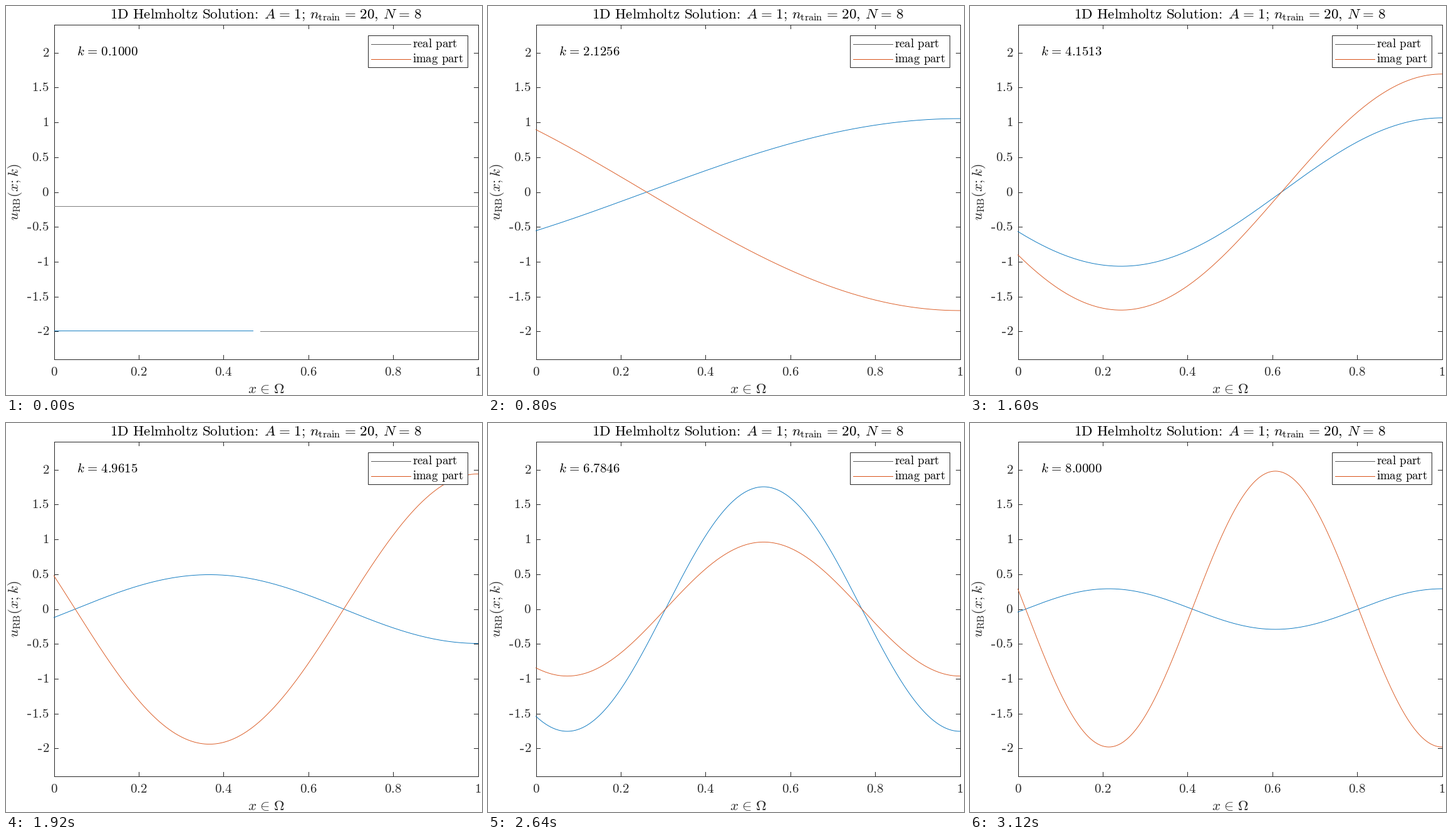
A matplotlib script for the animation above (3200 ms loop, 760x622 px).

```python
import numpy as np
import matplotlib.pyplot as plt
from matplotlib.animation import FuncAnimation
from matplotlib.patches import Rectangle

W, H, DPI = 760, 622, 64
FRAMES, INTERVAL = 40, 80
K_MIN, K_MAX = 0.1, 8.0

LEFT, RIGHT, TOP, BOTTOM = 76.5, 753.5, 29.5, 564.5
Y_ZERO, Y_UNIT = 297.5, 535 / 4.8

INK, GREY = "#262626", "#7f7f7f"
BLUE, ORANGE = "#0072BD", "#D95319"
BASE, LARGE, SMALL = 20.9, 23.0, 18.85

SP = r"\hspace{0.38}"
GAP = r"\hspace{0.115}"
EQ = GAP + "=" + GAP

plt.rcParams["mathtext.fontset"] = "cm"

fig = plt.figure(figsize=(W / DPI, H / DPI), dpi=DPI, facecolor="white")
ax = fig.add_axes([0, 0, 1, 1])
ax.set_xlim(0, W)
ax.set_ylim(H, 0)
ax.axis("off")


def pt(px):
    return px * 72 / DPI


def line(xs, ys, color=INK, width=1.0, z=3, **kw):
    return ax.plot(xs, ys, color=color, lw=pt(width), zorder=z, **kw)[0]


def label(x, y, tex, size=BASE, color=INK, ha="left", **kw):
    return ax.text(x, y, f"${tex}$", fontsize=pt(size), color=color, ha=ha,
                   va="baseline", zorder=8, **kw)


def to_x(x):
    return LEFT + x * (RIGHT - LEFT)


def to_y(u):
    return Y_ZERO - u * Y_UNIT


def draw_axes():
    ax.add_patch(Rectangle((LEFT, TOP), RIGHT - LEFT, BOTTOM - TOP, fill=False,
                           ec=INK, lw=pt(1), zorder=3))
    for v in np.linspace(0, 1, 6):
        x = to_x(v)
        line([x, x], [BOTTOM, BOTTOM - 6.5])
        line([x, x], [TOP, TOP + 6.5])
        label(x, 591, f"{v:.1g}", ha="center")
    for v in np.arange(-2, 2.1, 0.5):
        y = to_y(v)
        line([LEFT, LEFT + 6.5], [y, y])
        line([RIGHT, RIGHT - 6.5], [y, y])
        text = f"{abs(v):g}"
        label(69, round(y + 6), text, ha="right")
        if v < 0:
            # short hyphen in place of a full minus sign
            x = 67 - (27.5 if "." in text else 10.5)
            line([x - 6, x], [y + 1.5, y + 1.5], width=1.5,
                 solid_capstyle="butt")


def draw_labels():
    title = [
        (166, rf"\mathrm{{1D{SP}Helmholtz{SP}Solution}}\text{{:}}"),
        (412, f"A{EQ}1;"),
        (485, rf"n_{{\mathrm{{train}}}}{EQ}20,"),
        (602, f"N{EQ}8"),
    ]
    for x, tex in title:
        label(x, 20, tex, LARGE, "black")
    label(415, 619, rf"x{GAP}\in{GAP}\Omega", LARGE, ha="center")
    label(20, 298, r"u_{\mathrm{RB}}(x;k)", LARGE, ha="center",
          rotation=90, rotation_mode="anchor")


def draw_legend():
    ax.add_patch(Rectangle((577.5, 46.5), 159, 51, fc="white", ec=INK,
                           lw=pt(1), zorder=6))
    for y, word, color in ((60.5, "real", "#5a5a5a"), (84.5, "imag", ORANGE)):
        line([583, 646], [y, y], color, z=7)
        label(649, y + 5, rf"\mathrm{{{word}{SP}part}}", SMALL, "black")


class Curve:
    """A thin curve; almost level ones settle on pixel rows, partly grey."""

    def __init__(self, color, z):
        self.main = line([], [], color, 0.9, z)
        self.pale = line([], [], GREY, 1.0, z)

    def set(self, px, u):
        y = to_y(u)
        pale = np.zeros(y.shape, bool)
        if np.ptp(y) < 2:
            off = y - Y_ZERO
            row = np.round(off)
            pale = np.array([np.mean(row == r) > 0.49 for r in row])
            between = np.abs(np.abs(off - row) - 0.5) < 0.01
            y = np.where(between, np.nan, Y_ZERO + row)
        self.main.set_data(px, np.where(pale, np.nan, y))
        self.pale.set_data(px, np.where(pale, y, np.nan))


draw_axes()
draw_labels()
draw_legend()

xs = np.linspace(0, 1, 678)
px = to_x(xs)
real, imag = Curve(BLUE, 4), Curve(ORANGE, 5)
k_text = label(113, 79, "k", color="black")


def update(i):
    k = K_MIN + (K_MAX - K_MIN) * i / (FRAMES - 1)
    u = -2 * np.exp(1j * k) * np.cos(k * (1 - xs))
    real.set(px, u.real)
    imag.set(px, u.imag)
    k_text.set_text(f"$k{EQ}{k:.4f}$")
    return real.main, real.pale, imag.main, imag.pale, k_text


anim = FuncAnimation(fig, update, frames=FRAMES, interval=INTERVAL,
                     repeat=True, repeat_delay=0, blit=False)
plt.show()
```
